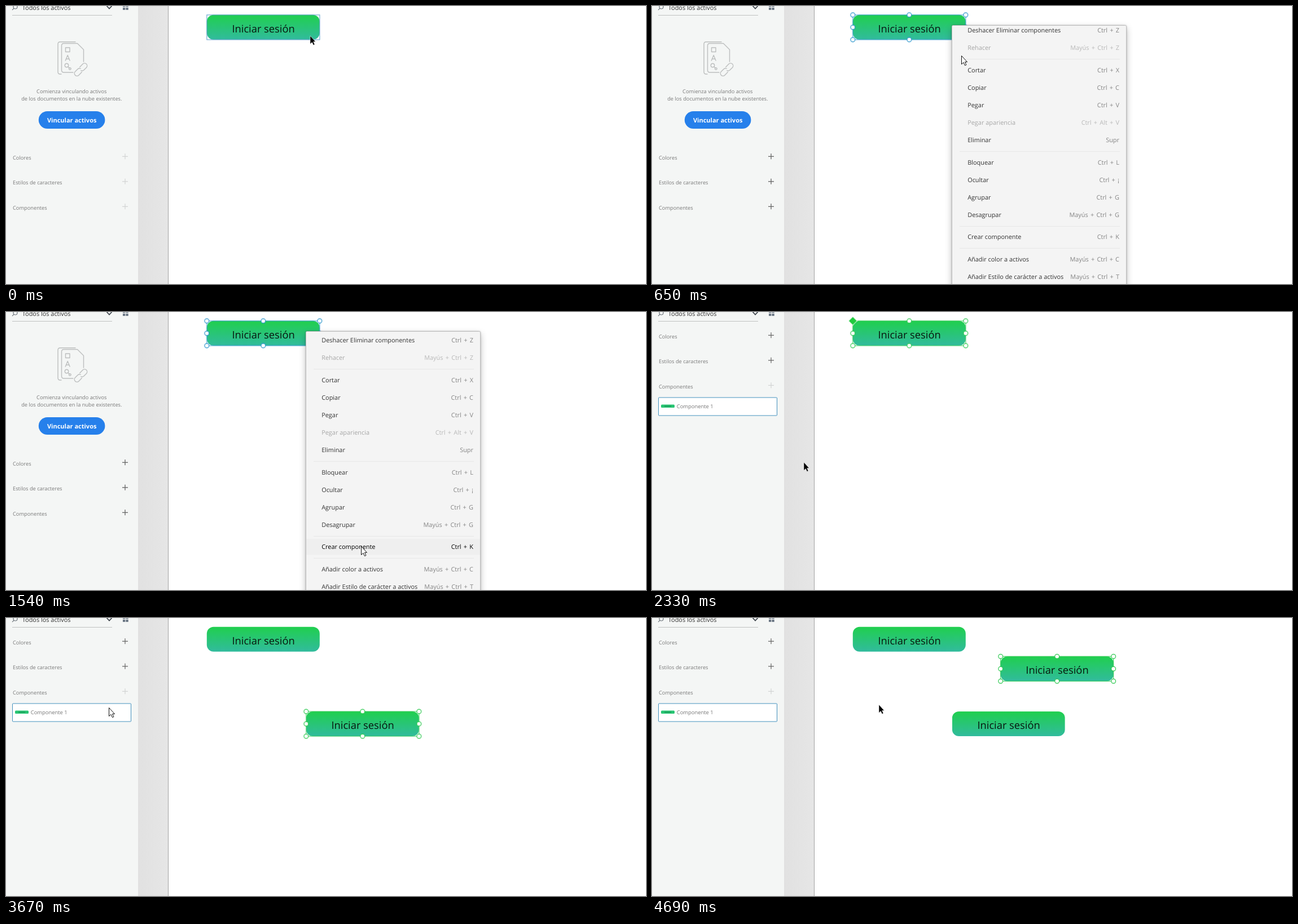
An HTML page for the animation above (4.74 s loop, 1134x494 px).

```html
<!DOCTYPE html>
<html lang="es">
<head>
<meta charset="utf-8">
<title>Crear componente</title>
<style>
html, body { margin: 0; width: 100%; height: 100%; overflow: hidden; background: #fff; }
svg { display: block; width: 100%; height: 100%; }
text { font-family: "Open Sans", "Noto Sans", sans-serif; text-rendering: geometricPrecision; white-space: pre; }
.line { fill: none; stroke: #bcbebe; stroke-width: 1.4; stroke-linecap: round; stroke-linejoin: round; }
.small { font-size: 9.25px; fill: #7a7a7a; }
.chip { font-size: 9.4px; fill: #777; }
.mid { text-anchor: middle; }
.label { font-size: 18.3px; fill: #08160e; text-anchor: middle; }
.item { font-size: 10.92px; fill: #333; }
.key { font-size: 10.92px; fill: #848484; text-anchor: end; word-spacing: 1.4px; }
.off { fill: #a6a6a6; }
.key.off { fill: #b8b8b8; }
.hot { fill: #000; }
.plus { stroke: #d2d4d4; stroke-width: 1.2; }
.dark { stroke: #666; }
.sheet { filter: drop-shadow(0 0 1.5px rgba(0,0,0,.22)) drop-shadow(0 5px 6px rgba(0,0,0,.24)); }

/* one loop is 4740 ms; 1% = 47.4 ms */
.t { animation: 4740ms step-end infinite; }
.hover { animation-name: hover; }
.picked { animation-name: picked; }
.active { animation-name: active; }
.master { animation-name: master; }
.empty { animation-name: empty; }
.filled { animation-name: filled; }
.menu { animation-name: menu; }
.row { animation-name: row; }
.copyA { animation-name: copyA; }
.copyB { animation-name: copyB; }
.pickA { animation-name: pickA; }
.press { animation-name: press; }
.drag { animation-name: drag; }
.black { animation-name: black; }
.white { animation-name: white; }
.slide { animation: slide 4740ms linear infinite; }
.pointer { animation: move 4740ms linear infinite; }

@keyframes hover { 0% { opacity: 1 } 5.27%, 100% { opacity: 0 } }
@keyframes picked { 0% { opacity: 0 } 5.27% { opacity: 1 } 38.19%, 100% { opacity: 0 } }
@keyframes active { 0% { opacity: 0 } 5.27%, 100% { opacity: 1 } }
@keyframes master { 0% { opacity: 0 } 38.19% { opacity: 1 } 67.51%, 100% { opacity: 0 } }
@keyframes empty { 0% { opacity: 1 } 39.03%, 100% { opacity: 0 } }
@keyframes filled { 0% { opacity: 0 } 39.03%, 100% { opacity: 1 } }
@keyframes menu { 0% { opacity: 0 } 11.6% { opacity: 1 } 37.34%, 100% { opacity: 0 } }
@keyframes row { 0% { opacity: 0 } 29.7% { opacity: 1 } 37.34%, 100% { opacity: 0 } }
@keyframes copyA { 0% { opacity: 0 } 67.51%, 100% { opacity: 1 } }
@keyframes copyB { 0% { opacity: 0 } 90.93%, 100% { opacity: 1 } }
@keyframes pickA { 0% { opacity: 0 } 67.51% { opacity: 1 } 90.93%, 100% { opacity: 0 } }
@keyframes press {
  0% { opacity: 0 } 5.27% { opacity: 1 } 8.4% { opacity: 0 }
  35.23% { opacity: 1 } 37.34% { opacity: 0 }
  55.1% { opacity: 1 } 67.51% { opacity: 0 }
  80.6% { opacity: 1 } 90.93%, 100% { opacity: 0 }
}
@keyframes drag {
  0% { opacity: 0 } 57.8% { opacity: 1 } 67.51% { opacity: 0 }
  82.5% { opacity: 1 } 90.93%, 100% { opacity: 0 }
}
@keyframes black {
  0% { opacity: 1 } 11.6% { opacity: 0 } 37.34% { opacity: 1 } 50.4% { opacity: 0 }
  67.51% { opacity: 1 } 76% { opacity: 0 } 90.93%, 100% { opacity: 1 }
}
@keyframes white {
  0% { opacity: 0 } 11.6% { opacity: 1 } 37.34% { opacity: 0 } 50.4% { opacity: 1 }
  67.51% { opacity: 0 } 76% { opacity: 1 } 90.93%, 100% { opacity: 0 }
}
@keyframes slide {
  0%, 11.6% { transform: translateY(-85px) }
  12.66% { transform: translateY(-24px) }
  13.71%, 14.77% { transform: translateY(-7px); animation-timing-function: ease-out }
  17.9%, 100% { transform: translateY(0) }
}
@keyframes move {
  0%, 1.05% { transform: translate(539px, 53px) }
  5.27%, 10.5% { transform: translate(531px, 35px) }
  13.71% { transform: translate(548px, 88px) }
  14.77% { transform: translate(548px, 88px); animation-timing-function: ease-in-out }
  23.42% { transform: translate(585px, 311px) }
  24.47% { transform: translate(585px, 311px); animation-timing-function: ease-out }
  31.2% { transform: translate(629px, 416px) }
  43.25% { transform: translate(629px, 416px); animation-timing-function: ease-in }
  49.16% { transform: translate(269px, 267px) }
  49.79% { transform: translate(269px, 267px); animation-timing-function: ease-out }
  54.01% { transform: translate(155px, 177px) }
  55.1% { transform: translate(148px, 166px) }
  57% { transform: translate(148px, 166px); animation-timing-function: ease-in-out }
  62.24% { transform: translate(667px, 190px) }
  64.35%, 65.1% { transform: translate(638px, 188px) }
  65.4% { transform: translate(632px, 188px) }
  67.51% { transform: translate(632px, 188px); animation-timing-function: ease-in-out }
  77.43%, 78.2% { transform: translate(182px, 159px) }
  78.48%, 79.54% { transform: translate(160px, 166px) }
  80.6% { transform: translate(146px, 166px) }
  82% { transform: translate(146px, 166px); animation-timing-function: ease-in-out }
  88.6% { transform: translate(741px, 92px) }
  90.3% { transform: translate(717px, 90px) }
  91.5% { transform: translate(717px, 90px); animation-timing-function: ease-in-out }
  98.95%, 100% { transform: translate(402px, 154px) }
}
</style>
</head>
<body>
<svg id="stage" xmlns="http://www.w3.org/2000/svg"></svg>
<script>
const BLUE = '#2693cb', GREEN = '#2bc84e';

const at = (x, y, body, cls = '') =>
  `<g transform="translate(${x} ${y})"><g class="${cls}">${body}</g></g>`;
const text = (x, y, cls, s) => `<text x="${x}" y="${y}" class="${cls}">${s}</text>`;
const rect = (x, y, w, h, attrs) => `<rect x="${x}" y="${y}" width="${w}" height="${h}" ${attrs}/>`;

const button = rect(0, 0, 200, 44, 'rx="12" fill="url(#green)"') + text(100.3, 31, 'label', 'Iniciar sesión');

const frame = color => rect(0, 0, 200, 44, `fill="none" stroke="${color}"`);

function handles(color) {
  let out = frame(color);
  for (const x of [0, 100, 200])
    for (const y of [0, 22, 44])
      if (x !== 100 || y !== 22)
        out += `<circle cx="${x}" cy="${y}" r="3.9" fill="#fff" stroke="${color}" stroke-width="1.2"/>`;
  return out;
}

const diamond = `<path d="M0-7.5 7.5 0 0 7.5-7.5 0Z" fill="#1fcb3e" stroke="#fff"/>`;

const chip = rect(0, 0, 24, 5.5, 'rx="1.5" fill="#28c573"') +
  rect(6, 2.3, 12, 1, 'fill="#17814b"') + text(27.8, 6.3, 'chip', 'Componente 1');

const plus = (y, cls = '') => `<path class="plus ${cls}" d="M206 ${y - 1.7}h10m-5-5v10"/>`;

const sections = ['Colores', 'Estilos de caracteres', 'Componentes'];
const sectionY = (top, i) => top + i * 44.5;
const titles = top => sections.map((s, i) => text(12, sectionY(top, i) + 3.5, 'small', s)).join('');
const pluses = cls => sections.map((s, i) => plus(sectionY(269, i), cls)).join('');

const search = `
  <g fill="none" stroke="#6d747b" stroke-width="1.2">
    <circle cx="16.5" cy="1.5" r="3.5"/><path d="M14 4.2l-3 3"/>
    <path d="M178.500 0l4.500 4.700 4.500-4.700" stroke="#444b52" stroke-width="1.7"/>
  </g>
  <path d="M207-3h4.300v4.300h-4.300zM212.400-3h4.300v4.300h-4.300zM207 2.700h4.300V7h-4.300zM212.400 2.700h4.300V7h-4.300z" fill="#6c7886"/>
  <path d="M11 16.500h177" stroke="#bfc1c1"/>` + text(28.8, 7, 'item', 'Todos los activos');

const docIcon = `
  <g class="line">
    <path d="M123 63.7H96q-4 0-4 4V117q0 4 4 4h2"/>
    <path d="M119 118H102.5q-4 0-4-4V70.5q0-4 4-4H126.5L137.5 77.5V99"/>
    <path d="M105.5 74h7.5v7.5h-7.5zM105.3 97l3.9-9.5 3.9 9.5M106.7 94h5"/>
    <circle cx="107.5" cy="105.5" r="3.2"/><circle cx="113.3" cy="111.5" r="1.8"/><path d="M110 108l2 2"/>
    <g transform="translate(132.5 113) rotate(-45)">
      <path d="M-2 4.5H-9.5a4.5 4.5 0 0 1 0-9H-3a4.5 4.5 0 0 1 4 3"/>
      <path d="M2-4.5H9.5a4.5 4.5 0 0 1 0 9H3a4.5 4.5 0 0 1-4-3"/>
    </g>
  </g>`;

const emptyPanel = docIcon +
  text(116.3, 155, 'small mid', 'Comienza vinculando activos') +
  text(116.3, 167.5, 'small mid', 'de los documentos en la nube existentes.') +
  rect(57.8, 187, 117.6, 31, 'rx="15.5" fill="#2680eb"') +
  '<text x="116.7" y="207" class="mid" font-size="11" font-weight="700" fill="#fff">Vincular activos</text>' +
  titles(269) + pluses('') + `<g class="t active">${pluses('dark')}</g>`;

const filledPanel = titles(43) + plus(43, 'dark') + plus(87.5, 'dark') + plus(132) +
  rect(11.5, 152, 210, 32, 'rx="1" fill="#fff" stroke="#4391bd"') + at(16, 164.5, chip);

// label, shortcut, disabled; null draws a divider
const entries = [
  ['Deshacer Eliminar componentes', 'Ctrl + Z'],
  ['Rehacer', 'Mayús + Ctrl + Z', true],
  null,
  ['Cortar', 'Ctrl + X'],
  ['Copiar', 'Ctrl + C'],
  ['Pegar', 'Ctrl + V'],
  ['Pegar apariencia', 'Ctrl + Alt + V', true],
  ['Eliminar', 'Supr'],
  null,
  ['Bloquear', 'Ctrl + L'],
  ['Ocultar', 'Ctrl + ¡'],
  ['Agrupar', 'Ctrl + G'],
  ['Desagrupar', 'Mayús + Ctrl + G'],
  null,
  ['Crear componente', 'Ctrl + K'],
  null,
  ['Añadir color a activos', 'Mayús + Ctrl + C'],
  ['Añadir Estilo de carácter a activos', 'Mayús + Ctrl + T']
];

const entry = (y, [label, key], cls) =>
  text(559.2, y + 4, 'item ' + cls, label) + text(828, y + 4, 'key ' + cls, key);

function menuItems() {
  let y = 50, out = '';
  for (const e of entries) {
    if (!e) {
      out += `<path d="M545 ${Math.round(y - 11) + .5}h284" stroke="#e7e7e7"/>`;
      y += 8.8;
      continue;
    }
    if (e[0] === 'Crear componente')
      out += entry(y, e, '') +
        `<g class="t row">${rect(532, 403, 308, 28.5, 'fill="#efefef"')}${entry(y, e, 'hot')}</g>`;
    else
      out += entry(y, e, e[2] ? 'off' : '');
    y += 31;
  }
  return out;
}

const menu = rect(531.5, 34.5, 309, 600, 'rx="2" fill="#f4f4f4" stroke="#bcbcbc" class="sheet"') +
  `<g clip-path="url(#menuClip)"><g class="slide">${menuItems()}</g></g>`;

const pointer = `
  <circle class="t press" r="12" fill="#ffff5c" fill-opacity=".88"/>
  <g class="t drag">${at(-139, -1, chip)}</g>
  <path class="t black" d="M0 0V14.5L3.3 11.5 5.7 16.5 8 15.4 5.7 10.5H9.5Z" fill="#000" stroke="#fff" stroke-width=".5"/>
  <path class="t white" d="M.5.5V15.5L4 12.3 6.5 17.7 8.9 16.6 6.5 11.4H10.5Z" fill="#fff" stroke="#111"/>`;

document.getElementById('stage').innerHTML = `
  <defs>
    <linearGradient id="green" x2="0" y2="1">
      <stop stop-color="#20cf4e"/><stop offset="1" stop-color="#31bb9d"/>
    </linearGradient>
    <linearGradient id="board"><stop stop-color="#e1e1e1"/><stop offset="1" stop-color="#e6e6e6"/></linearGradient>
    <clipPath id="menuClip">${rect(531, 34, 310, 600, '')}</clipPath>
  </defs>
  ${rect(0, 0, 234, 494, 'fill="#f4f6f5"')}
  ${rect(234, 0, 53, 494, 'fill="url(#board)"')}
  ${rect(287, 0, 1, 494, 'fill="#a3a3a3"')}
  ${search}
  <g class="t empty">${emptyPanel}</g>
  <g class="t filled">${filledPanel}</g>
  ${at(355.8, 15.8, button)}
  ${at(355.8, 15.8, frame('#4b93c6'), 't hover')}
  ${at(355.8, 15.8, handles(BLUE), 't picked')}
  ${at(355.8, 15.8, handles(GREEN) + diamond, 't master')}
  ${at(531.8, 166.1, button, 't copyA')}
  ${at(531.8, 166.1, handles(GREEN), 't pickA')}
  ${at(617.7, 68.2, button + handles(GREEN), 't copyB')}
  <g class="t menu">${menu}</g>
  <g class="pointer">${pointer}</g>`;
</script>
</body>
</html>
```
